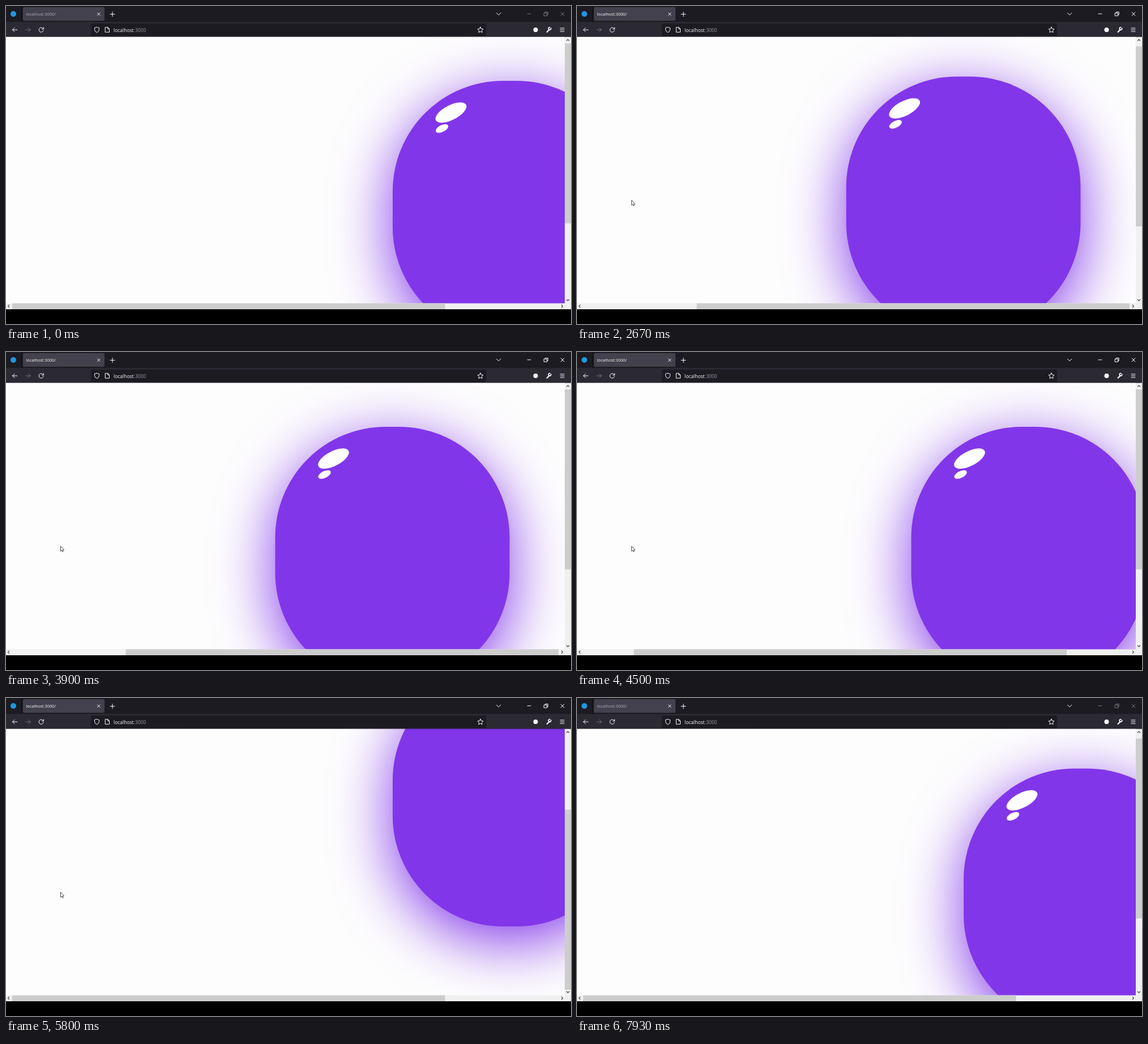
An HTML page that plays this animation: 998 px wide and 561 px high, repeating every 8760 ms.

```html
<!DOCTYPE html>
<html lang="en">
<head>
<meta charset="utf-8">
<title>Scrolling ball</title>
<style>
html, body { margin: 0; width: 100%; height: 100%; overflow: hidden; background: #000; }
#page { position: absolute; left: 0; top: 54px; width: 987px; height: 471px; overflow: hidden; background: #fdfdfd; }
#ball { position: absolute; left: 682.5px; top: 77.5px; width: 414.5px; height: 453px; border-radius: 195px;
  background: #8236e9; box-shadow: 0 26px 104px #8236e9; }
#ball i { position: absolute; border-radius: 50%; background: #fefefe; transform: translate(-50%, -50%) rotate(-27deg); }
svg { position: absolute; left: 0; top: 0; font-family: "Open Sans", "Noto Sans", sans-serif; }
.line { fill: none; stroke: #fbfbfe; stroke-width: 1; stroke-linecap: round; stroke-linejoin: round; }
.arrows { fill: none; stroke: #505050; stroke-width: 1.3; }
</style>
</head>
<body>
<div id="page">
  <div id="ball">
    <i style="left:103px;top:56.2px;width:60px;height:26px"></i>
    <i style="left:87.3px;top:84.7px;width:24px;height:11.6px"></i>
  </div>
</div>
<svg width="998" height="561" viewBox="0 0 998 561">
  <!-- tab strip and toolbar -->
  <rect width="998" height="28" fill="#1c1b22"/>
  <rect y="28" width="998" height="26" fill="#2b2a33"/>
  <rect y="53.7" width="998" height=".7" fill="#15141a"/>
  <path d="M27.5 0V28" stroke="#0c0c0d"/>
  <rect x="30" y="2" width="144" height="24" rx="2.5" fill="#42414d"/>
  <rect x="150" y="31" width="698" height="22" rx="2.5" fill="#1c1b22"/>
  <circle cx="13" cy="14" r="5" fill="#2097e0"/>
  <text id="title" x="35.5" y="17.3" font-size="7.4">localhost:3000/</text>
  <text x="190" y="45.6" font-size="8.5" fill="#fbfbfe">localhost<tspan fill="#9b9aa3">:3000</tspan></text>
  <g class="line">
    <path d="M161.5 12l4.5 4.5m0-4.5l-4.5 4.5M184 14.5h8m-4-4v8M866.5 12.2l3.7 3.7 3.7-3.7"/>
    <path d="M11.5 42h8.3m-8.3 0l3.6-3.6m-3.6 3.6l3.6 3.6"/>
    <path d="M34.8 42h8.3m0 0l-3.6-3.6m3.6 3.6l-3.6 3.6" stroke="#74737d"/>
    <path d="M65.4 39.5a4.1 4.1 0 1 0 .8 3.5M66.5 37.8v3h-3"/>
    <path d="M160.5 37.4l4 1.4v2.5q0 4-4 5.4q-4-1.4-4-5.4v-2.5z"/>
    <path d="M175.6 37.6h4.3l2.6 2.6v6h-6.9zM179.8 37.8v2.6h2.6"/>
    <path d="M838 37l1.5 3.2 3.5.5-2.5 2.4.6 3.5-3.1-1.7-3.1 1.7.6-3.5-2.5-2.4 3.5-.5z"/>
    <path d="M955.6 45.8l4-4" stroke-width="2.2"/>
    <path d="M962.6 39.2a2.2 2.2 0 1 1-2-1.6" stroke-width="1.8"/>
    <path d="M979 39h7m-7 3h7m-7 3h7"/>
  </g>
  <circle cx="935.5" cy="42" r="4" fill="#fbfbfe"/>
  <path id="controls" class="line" d="M921 13.8h6M950.5 12.3h5v5h-5zM952.3 12v-1.4h4.9v4.9h-1.4M980 11l6 6m0-6l-6 6"/>
  <!-- scrollbars -->
  <path d="M987 54.5h11v480.5H0v-10.5h987z" fill="#f0f0f0"/>
  <rect id="thumbY" x="987" width="11" height="317.5" fill="#cdcdcd"/>
  <rect id="thumbX" y="524.5" width="764.5" height="10.5"/>
  <path class="arrows" d="M990 61.5l2.5-2.5 2.5 2.5M990 517.5l2.5 2.5 2.5-2.5M6 527l-2.5 2.5 2.5 2.5M981 527l2.5 2.5-2.5 2.5"/>
  <path id="cursor" d="M.5.5v9l2-1.8 1.3 2.9 1.4-.6-1.3-2.8h2.6z" fill="#fff" stroke="#222" stroke-width=".8"/>
  <rect y="535" width="998" height="26"/>
</svg>
<script>
const LOOP = 8760;
const el = id => document.getElementById(id);
const [ball, title, controls, thumbX, thumbY, cursor] =
  ["ball", "title", "controls", "thumbX", "thumbY", "cursor"].map(el);

const smooth = u => u * u * (3 - 2 * u);
const easeOut = power => u => 1 - (1 - u) ** power;

// Scroll gestures: start, end, position reached, easing
const scrollX = [
  [1270, 1930, 190.5, easeOut(1.62)],
  [2140, 2230, 207.5, smooth],
  [4300, 4570, 78, easeOut(1.6)],
  [4840, 4970, 0, smooth]
];
const scrollY = [
  [2640, 2870, 150, smooth],
  [3070, 3300, 182, smooth],
  [3740, 3900, 0, smooth],
  [5270, 5430, 148, smooth],
  [5670, 5800, 182, smooth],
  [6140, 6570, 7.5, easeOut(2.05)]
];

function position(gestures, t) {
  let value = 0;
  for (const [start, end, target, ease] of gestures) {
    if (t <= start) break;
    value += (target - value) * ease(Math.min(1, (t - start) / (end - start)));
  }
  return value;
}

function draw(now) {
  const t = now % LOOP;
  const x = position(scrollX, t), y = position(scrollY, t);
  ball.style.transform = `translate(${-x}px, ${-y}px)`;
  thumbX.setAttribute("x", 11 + x * 0.966);
  thumbY.setAttribute("y", 66 + y * 0.72);

  const focused = t >= 770 && t < 7630;
  title.setAttribute("fill", focused ? "#fbfbfe" : "#b0afb8");
  controls.style.stroke = focused ? "#fbfbfe" : "#77767f";

  const leave = smooth(Math.min(1, Math.max(0, (t - 6840) / 560)));
  const tipY = 342 + 194 * leave;
  cursor.setAttribute("transform", `translate(${96 + 40 * leave} ${tipY})`);
  cursor.style.display = t >= 800 && t < 7400 ? "" : "none";
  thumbX.setAttribute("fill", tipY > 524 && t < 7900 ? "#a6a6a6" : "#cdcdcd");
}

function tick() {
  draw(performance.now());
  requestAnimationFrame(tick);
}
tick();
</script>
</body>
</html>
```
